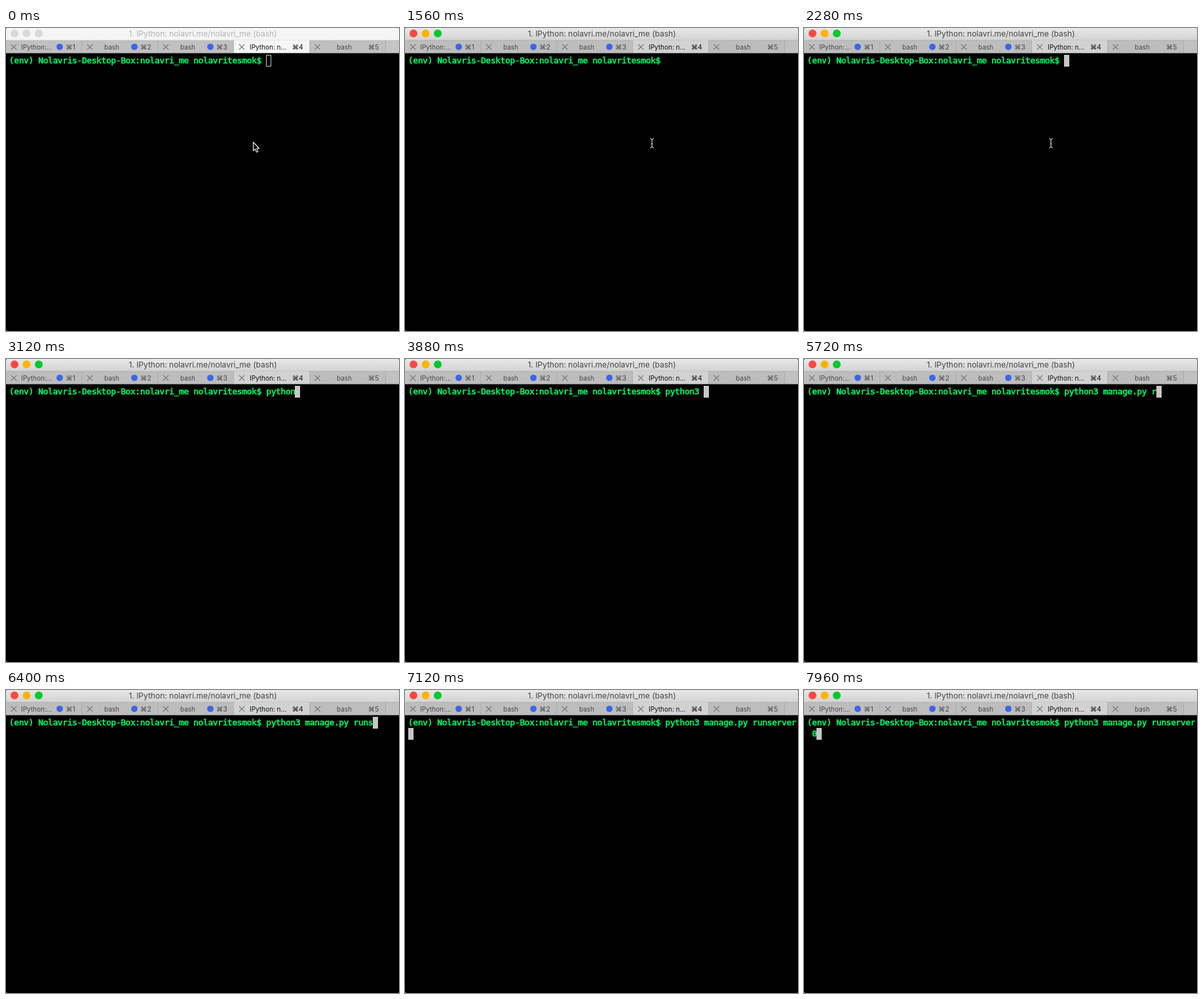
Animation of 600x463 px, one loop 8 s. Source, as an HTML page with a canvas:

```html
<!DOCTYPE html>
<html lang="en">
<head>
<meta charset="utf-8">
<title>Terminal session</title>
<style>
  html, body { margin: 0; width: 100%; height: 100%; overflow: hidden; background: #000; }
  canvas { display: block; width: 600px; height: 463px; }
</style>
</head>
<body>
<canvas id="stage"></canvas>
<script>
const W = 600, H = 463, LOOP = 8000;
const FOCUS = 1040;          // the window is clicked and becomes active
const BLINK = 500;
const UI = 'Inter, Roboto, sans-serif';
const MONO = '"DejaVu Sans Mono", "Liberation Mono", monospace';
const CELL = 7.405, LEFT = 5, COLS = 80, ROW = 17.6;
const GREEN = '#00fc66', CURSOR = '#c7c7c7';

const PROMPT = '(env) Nolavris-Desktop-Box:nolavri_me nolavritesmok$ ';
const TITLE = '1. IPython: nolavri.me/nolavri_me (bash)';

// [time, text that arrives]
const KEYS = [
  [2560, 'p'], [2680, 'y'], [2760, 't'], [2880, 'h'], [2960, 'o'], [3080, 'n'],
  [3520, '3'], [3720, ' '], [3960, 'm'], [4120, 'a'], [4360, 'nage.py '],
  [5600, 'r'], [5840, 'u'], [6040, 'n'], [6320, 's'], [6440, 'e'], [6640, 'r'],
  [6840, 'v'], [6960, 'e'], [7040, 'r'], [7480, ' '], [7800, '0']
];

const TABS = [
  { x: 0, label: 'IPython:...', labelX: 23, dot: 82 },
  { x: 116, label: 'bash', labelX: 150, dot: 196 },
  { x: 232, label: 'bash', labelX: 266, dot: 312 },
  { x: 348, label: 'IPython: n...', labelX: 372, active: true },
  { x: 463.5, label: 'bash', labelX: 505 }
];

const canvas = document.getElementById('stage');
const ctx = canvas.getContext('2d');
const dpr = window.devicePixelRatio || 1;
canvas.width = Math.round(W * dpr);
canvas.height = Math.round(H * dpr);
ctx.scale(dpr, dpr);
ctx.lineJoin = 'round';

function rect(x, y, w, h, color) {
  ctx.fillStyle = color;
  ctx.fillRect(x, y, w, h);
}

function disc(x, y, r, color) {
  ctx.beginPath();
  ctx.arc(x, y, r, 0, Math.PI * 2);
  ctx.fillStyle = color;
  ctx.fill();
}

function text(str, x, y, font, color, align = 'left') {
  ctx.font = font;
  ctx.fillStyle = color;
  ctx.textAlign = align;
  ctx.fillText(str, x, y);
}

function path(points, color, width, closed) {
  ctx.beginPath();
  points.forEach(([x, y]) => ctx.lineTo(x, y));
  if (closed) ctx.closePath();
  ctx.strokeStyle = color;
  ctx.lineWidth = width;
  ctx.stroke();
}

function drawTitleBar(focused) {
  const fill = ctx.createLinearGradient(0, 0, 0, 19);
  fill.addColorStop(0, focused ? '#e8e8e8' : '#f6f6f6');
  fill.addColorStop(1, focused ? '#d2d2d2' : '#f4f4f4');
  rect(0, 0, W, 19, fill);
  const lights = focused ? ['#fd4844', '#fdb400', '#06c92e'] : Array(3).fill('#d9d9d9');
  lights.forEach((color, i) => disc(13 + i * 18.5, 8.3, 6, color));
  text(TITLE, 300.5, 13, '12px ' + UI, focused ? '#454545' : '#b2b2b2', 'center');
}

function drawTabs(focused) {
  rect(0, 19, W, 20, focused ? '#bdbdbd' : '#c0c0c0');
  rect(579, 19, 21, 20, focused ? '#c1c1c1' : '#c5c5c5');
  rect(0, 18.5, W, 0.8, focused ? '#a9a9a9' : '#bcbcbc');
  TABS.forEach((tab, i) => {
    const { x, label, labelX, dot, active } = tab;
    if (active) rect(x, 18.5, 115.5, 20.5, focused ? '#d2d2d2' : '#f5f5f5');
    const ink = active ? '#101010' : '#484848';
    const cx = x + 12;
    path([[cx - 4.2, 24.8], [cx + 4.2, 33.2]], '#757575', 1.2);
    path([[cx + 4.2, 24.8], [cx - 4.2, 33.2]], '#757575', 1.2);
    text(label, labelX, 32.5, '10px ' + UI, ink);
    if (dot) disc(dot, 28.8, 4.9, '#3b66ea');
    text('\u2318' + (i + 1), x + 105.8, 32.5, '10.4px Inter, "DejaVu Sans", sans-serif', ink, 'right');
    rect(x + 115.5, 19, 0.8, 20, '#a6a6a6');
  });
  rect(0, 38, W, 1, '#5c5c5c');
}

function drawLine(line) {
  ctx.strokeStyle = GREEN;
  ctx.lineWidth = 0.6;
  for (let i = 0; i < line.length; i++) {
    const x = LEFT + (i % COLS + 0.5) * CELL;
    const y = 53.5 + Math.floor(i / COLS) * ROW;
    text(line[i], x, y, '12.9px ' + MONO, GREEN, 'center');
    ctx.strokeText(line[i], x, y);   // thickens the regular weight
  }
}

function drawTerminal(t, focused) {
  const keys = KEYS.filter(([at]) => at <= t);
  const line = PROMPT + keys.map(key => key[1]).join('');
  drawLine(line);

  const x = Math.floor(LEFT + (line.length % COLS) * CELL);
  const y = Math.floor(41 + Math.floor(line.length / COLS) * ROW);
  if (!focused) {
    ctx.strokeStyle = CURSOR;
    ctx.lineWidth = 1;
    ctx.strokeRect(x + 0.5, y + 0.5, 7, 17);
    return;
  }
  const since = t - (keys.length ? keys[keys.length - 1][0] : FOCUS);
  if (Math.floor(since / BLINK) % 2 === 0) rect(x, y, 8, 18, CURSOR);
}

function drawPointer(t, focused) {
  if (t >= KEYS[0][0]) return;
  if (focused) {
    path([[374, 169], [375.5, 169.3], [377, 171], [377, 181], [375.5, 182.7], [374, 183]], '#d8d8d8', 1.1);
    path([[380, 169], [378.5, 169.3], [377, 171]], '#d8d8d8', 1.1);
    path([[380, 183], [378.5, 182.7], [377, 181]], '#d8d8d8', 1.1);
    path([[375.5, 177], [378.5, 177]], '#d8d8d8', 1);
    return;
  }
  path([[377.5, 174.5], [377.5, 187.5], [380.4, 184.8], [382.5, 189.7],
        [384.7, 188.8], [382.7, 184], [386.6, 184]], '#f2f2f2', 1.1, true);
}

function drawCorners(focused) {
  rect(0, 0, 1, 1, '#555');
  rect(W - 1, 0, 1, 1, '#777');
  rect(0, H - 2, 1, 2, focused ? '#555' : '#8a4a20');
  rect(1, H - 1, 1, 1, focused ? '#444' : '#6b3818');
  rect(W - 1, H - 1, 1, 1, '#444');
}

function draw(t) {
  const focused = t >= FOCUS;
  rect(0, 0, W, H, '#000');
  drawTitleBar(focused);
  drawTabs(focused);
  drawTerminal(t, focused);
  drawPointer(t, focused);
  drawCorners(focused);
}

const start = performance.now();
function tick() {
  draw((performance.now() - start) % LOOP);
  requestAnimationFrame(tick);
}
tick();
</script>
</body>
</html>
```
